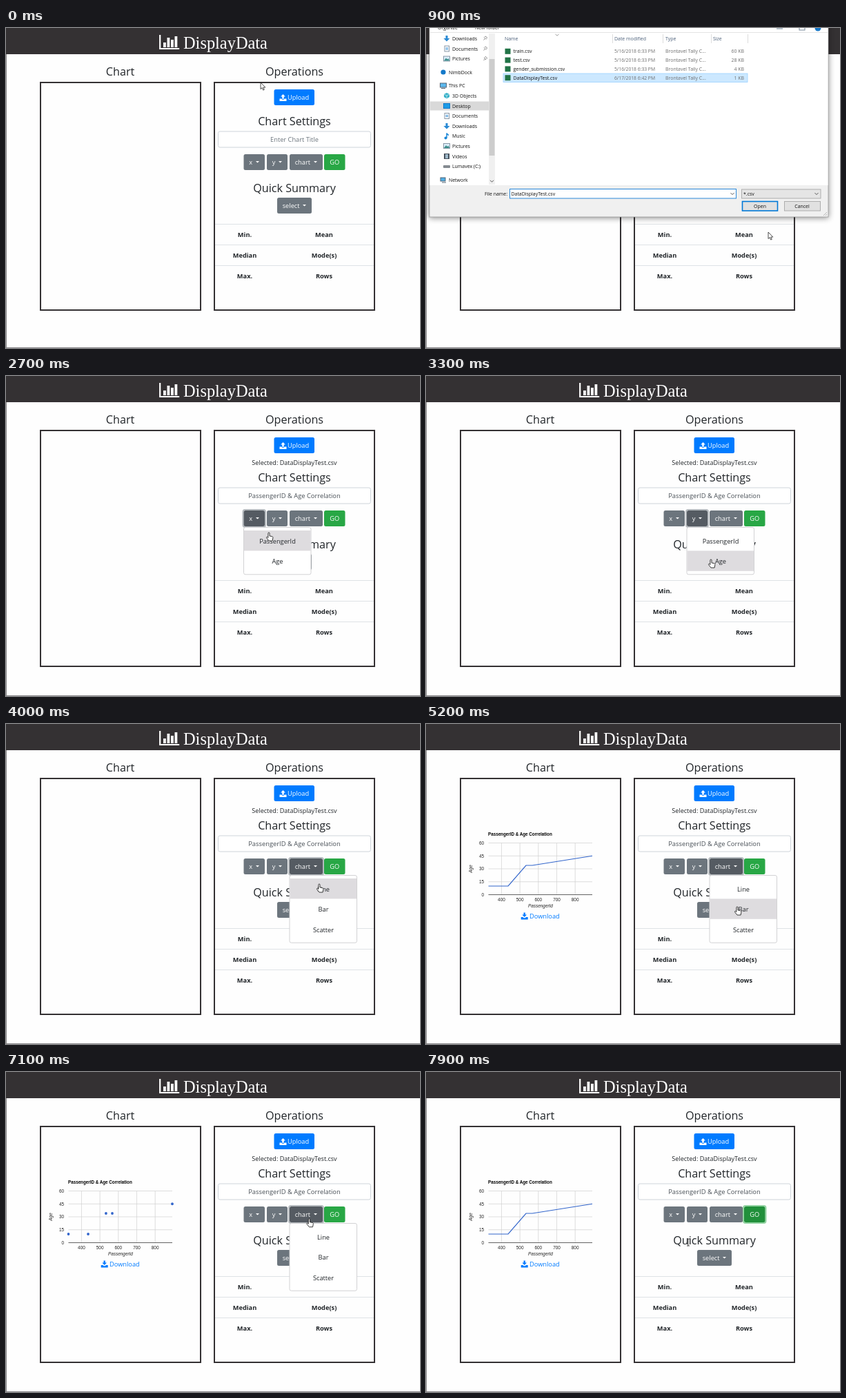
These frames come from a looping animation (600 by 464 pixels, 8 s). An HTML page:

```html
<!DOCTYPE html>
<html lang="en">
<head>
<meta charset="utf-8">
<title>Chart builder demo</title>
<style>
  html, body { margin: 0; width: 100%; height: 100%; overflow: hidden; background: #fefefe; }
  svg { display: block; width: 600px; height: 464px; }
  text { font: 9.25px "Open Sans", "Noto Sans", sans-serif; fill: #212529; white-space: pre; }
  .mid { text-anchor: middle; }
  .end { text-anchor: end; }
  .brand { font: 24.4px "Liberation Serif", serif; fill: #fff; }
  .head { font-size: 16.2px; }
  .white { fill: #fff; }
  .link { fill: #007bff; }
  .bold { font-weight: 700; }
  .hint { fill: #6c757d; }
  .typed { fill: #495057; font-size: 9.35px; }
  .win text { font-size: 6.95px; fill: #111; }
  .win .dim { fill: #6d6d6d; }
  .win .col { fill: #4c607a; }
  .win { filter: drop-shadow(0 1px 4px #0007); }
  .plot text { font: 6.4px "Liberation Sans", Arial, sans-serif; fill: #222; }
  .plot .title { font-weight: 700; font-size: 6.27px; fill: #000; }
  .plot .axis { font-style: italic; }
</style>
</head>
<body>
<svg id="stage" viewBox="0 0 600 464"></svg>
<script>
const LOOP = 8000, STEP = 100;
const TITLE = 'PassengerID & Age Correlation', FILE = 'DataDisplayTest.csv';
const DIALOG = [400, 1200], PICKED = 600, TYPING = [1500, 2100];

// time, x, y, pointer shape held until the next entry
const PATH = [
  [0, 369, 79, 'arrow'], [200, 408, 100, 'hand'], [400, 410, 101, 'arrow'],
  [600, 190, 72, 'arrow'], [700, 200, 76, 'arrow'], [900, 496, 296, 'arrow'],
  [1000, 486, 261, 'arrow'], [1200, 483, 256, 'arrow'], [1500, 440, 173, 'beam'],
  [2100, 440, 175, 'beam'], [2400, 360, 205, 'hand'], [2500, 360, 206, 'hand'],
  [2700, 381, 227, 'hand'], [2800, 381, 236, 'hand'], [3000, 392, 206, 'hand'],
  [3300, 413, 266, 'hand'], [3600, 433, 206, 'hand'], [3700, 434, 207, 'hand'],
  [4000, 454, 232, 'hand'], [4400, 476, 206, 'hand'], [4500, 476, 206, 'hand'],
  [4800, 435, 206, 'hand'], [5200, 451, 265, 'hand'], [5600, 476, 206, 'hand'],
  [6000, 435, 206, 'hand'], [6400, 446, 297, 'hand'], [6800, 476, 206, 'hand'],
  [7000, 435, 206, 'hand'], [7300, 452, 232, 'hand'], [7600, 476, 206, 'hand'],
  [7700, 474, 208, 'arrow'], [7900, 380, 247, 'beam']
];

// click time, button, time its menu closes
const CLICKS = [
  [2500, 'x', 2900], [3100, 'y', 3400], [3700, 'chart', 4100], [4500, 'GO'],
  [4800, 'chart', 5300], [5600, 'GO'], [6000, 'chart', 6500], [6800, 'GO'],
  [7000, 'chart', 7400], [7600, 'GO']
];
const FIELDS = ['PassengerId', 'Age'];
const MENUS = { x: FIELDS, y: FIELDS, chart: ['Line', 'Bar', 'Scatter'] };
const BUTTONS = { x: [344.5, 30.5], y: [378, 30], chart: [411, 48], GO: [461, 30.5] };
const DATA = [[329, 10], [436, 10], [533, 34], [567, 34], [893, 45]];

const stage = document.getElementById('stage');
const within = (t, [a, b]) => t >= a && t < b;
const esc = s => s.replace(/&/g, '&amp;');
const text = (x, y, s, cls = '', more = '') =>
  `<text x="${x}" y="${y}" class="${cls}" ${more}>${esc(String(s))}</text>`;
const rect = (x, y, w, h, fill, more = '') =>
  `<rect x="${x}" y="${y}" width="${w}" height="${h}" fill="${fill}" ${more}/>`;
const path = (d, fill, more = '') => `<path d="${d}" fill="${fill}" ${more}/>`;
const line = (d, color, width = 1) => path(d, 'none', `stroke="${color}" stroke-width="${width}"`);
const move = (x, y, s) => `<g transform="translate(${x} ${y})">${s}</g>`;
const chevron = (x, y, color = '#555') => line(`M${x - 2.5} ${y - 1.2}l2.5 2.5 2.5-2.5`, color);

const TRAY = 'M0 6h2.7l1.3 1.3h2L7.3 6H10v3.6H0z';
const upIcon = TRAY + 'M5-.5l3.3 3.4H6.2v3.4H3.8V2.9H1.7z';
const downIcon = TRAY + 'M3.8-.5h2.4v3h2.1L5 6 1.7 2.5h2.1z';

const POINTERS = {
  arrow: path('M0 0v9.6l2.2-2 1.5 3.5 1.6-.7-1.5-3.3h3z', '#fff', 'stroke="#222" stroke-width=".8"'),
  hand: path('M-1.1 1.2c0-1.7 2.1-1.7 2.1 0v3.7l3.7.8c1 .3 1.4.9 1.2 1.9l-.8 4.4H0l-3.4-4.3c-.6-1 .5-1.8 1.3-1.1l1 .9z',
    '#fff', 'stroke="#222" stroke-width=".9"'),
  beam: line('M-2-5h4M0-5v10M-2 5h4', '#333', .9)
};

function pointer(t) {
  let i = PATH.length - 1;
  while (PATH[i][0] > t) i--;
  const [t0, x0, y0, shape] = PATH[i];
  const [t1, x1, y1] = PATH[i + 1] || [LOOP, x0, y0];
  const u = (t - t0) / (t1 - t0), k = u * u * (3 - 2 * u);
  return { x: x0 + (x1 - x0) * k, y: y0 + (y1 - y0) * k, shape };
}

function button(label, x, y, w, active) {
  const go = label === 'GO';
  const fill = go ? (active ? '#21903b' : '#28a745') : (active ? '#555b62' : '#6c757d');
  const ring = active
    ? rect(x - 1, y - 1, w + 2, 25, 'none', `rx="3" stroke="${go ? '#93d3a2' : '#b5babe'}" stroke-width="2"`) : '';
  const body = ring + rect(x, y, w, 23, fill, 'rx="2.5"');
  return go ? body + text(x + w / 2, y + 15.3, label, 'mid white')
    : body + text(x + 7.7, y + 15.3, label, 'white') + path(`M${x + w - 13} ${y + 10}h5l-2.5 2.6z`, '#fff');
}

function header() {
  const bars = [[228, 7], [233.5, 14], [239, 11], [244.5, 16]];
  return rect(0, 0, 600, 38, '#343133') + line('M223.2 10v20h28', '#fff', 2.2) +
    bars.map(([x, h]) => rect(x, 28 - h, 3.8, h, '#fff')).join('') +
    text(257, 30, 'DisplayData', 'brand');
}

function menu(name, cur) {
  const x = BUTTONS[name][0], items = MENUS[name], pitch = 29.4;
  const over = cur.x > x && cur.x < x + 97 ? Math.floor((cur.y - 224) / pitch) : -1;
  return rect(x, 219.5, 97.5, items.length * pitch + 9.5, '#fff', 'rx="2.5" stroke="#d2d2d4"') +
    items.map((s, i) => (i === over ? rect(x + .5, 224 + i * pitch, 96.5, pitch, '#dedcdf') : '') +
      text(x + 49, 243 + i * pitch, s, 'mid')).join('');
}

function plot(kind) {
  const L = 90.5, R = 241, T = 172.5, B = 247.5, bar = kind === 'bar';
  const idX = v => L + (v - 329) * .2668, ageY = v => B - v * 1.25;
  const ageX = v => L + v * 2.508, idY = v => T + .5 + (900 - v) * .127;
  const ages = [0, 15, 30, 45, 60];
  const xs = bar ? ages.map(v => [v, ageX(v)]) : [4, 5, 6, 7, 8].map(n => [n * 100, idX(n * 100)]);
  const ys = bar ? [900, 775, 650, 525, 400].map(v => [v, idY(v)]) : ages.map(v => [v, ageY(v)]);
  let s = text(90, 162.3, TITLE, 'title');
  for (const [v, x] of xs) s += line(`M${x} ${T}V${B}`, '#d0d0d0', .7) + text(x, 256.6, v, 'mid');
  for (const [v, y] of ys) s += line(`M${L} ${y}H${R}`, '#d0d0d0', .7) + text(84, y + 2.3, v, 'end');
  s += line(bar ? `M${L} ${T}V${B}` : `M${L} ${B}H${R}`, '#444', .8);
  if (bar) s += DATA.map(([id, age]) => rect(L, idY(id) - 1.1, age * 2.508, 2.2, '#3366cc')).join('');
  else if (kind === 'line') s += line('M' + DATA.map(([id, age]) => `${idX(id)} ${ageY(age)}`).join('L'), '#3366cc', 1.2);
  else s += DATA.map(([id, age]) => `<circle cx="${idX(id)}" cy="${ageY(age)}" r="1.9" fill="#3366cc"/>`).join('');
  s += text(166, 266, 'PassengerId', 'axis mid') + text(0, 0, 'Age', 'axis mid', 'transform="translate(66.5 210) rotate(-90)"');
  return `<g class="plot">${s}</g>` + move(137.7, 274, path(downIcon, '#007bff')) + text(150, 282.3, 'Download', 'link');
}

function page(t, focus) {
  const uploaded = t >= DIALOG[1], drop = uploaded ? 12 : 0;
  const frame = x => rect(x, 79, 232, 330 + drop, 'none', 'stroke="#343133" stroke-width="2"');
  const typed = TITLE.slice(0, Math.max(0, Math.round((t - TYPING[0]) / (TYPING[1] - TYPING[0]) * TITLE.length)));
  let s = rect(0, 0, 600, 464, '#fefefe') + line('M.5 38V464M0 463.5H600', '#8a888b') + header() +
    text(165.5, 69.3, 'Chart', 'head mid') + text(418, 69.3, 'Operations', 'head mid') + frame(50) + frame(302) +
    rect(388.5, 89, 58.5, 23, '#007bff', 'rx="2.5"') + move(396.5, 96.5, path(upIcon, '#fff')) +
    text(408, 104.3, 'Upload', 'white');
  if (uploaded) s += text(418, 129.3, 'Selected: ' + FILE, 'mid', 'style="font-size:9.05px"');

  const editing = within(t, TYPING);
  let low = text(418, 141, 'Chart Settings', 'head mid') +
    rect(307.5, 150, 221, 23, '#fff', `rx="2.5" stroke="${editing ? '#80bdff' : '#ced4da'}"`) +
    (typed ? text(418, 165, typed, 'mid typed') : text(418, 165, 'Enter Chart Title', 'mid hint'));
  for (const [name, [x, w]] of Object.entries(BUTTONS)) low += button(name, x, 183, w, focus === name);
  low += text(418, 237.5, 'Quick Summary', 'head mid') + button('select', 393, 246, 50, false);
  [['Min.', 'Mean'], ['Median', 'Mode(s)'], ['Max.', 'Rows']].forEach(([a, b], i) => {
    const y = 284 + i * 30;
    low += line(`M303 ${y}.5H533`, '#dee2e6') + text(346, y + 18.7, a, 'mid bold') + text(461, y + 18.7, b, 'mid bold');
  });
  return s + move(0, drop, low);
}

function navIcon(kind, x, y) {
  const blue = '#2a8ad4';
  switch (kind) {
    case 'down': return path(`M${x - 1.5} ${y - 4}h3v4h3l-4.5 4.5-4.5-4.5h3z`, blue);
    case 'doc': return rect(x - 3, y - 4, 6.5, 8, '#fff', 'stroke="#8796a5"') + line(`M${x - 1.5} ${y - 1}h3.5m-3.5 2h3.5`, blue);
    case 'pic': return rect(x - 4.5, y - 3.5, 9, 7, '#dceefa', 'stroke="#8796a5"') + path(`M${x - 4} ${y + 3}l3-4 2 2 1.5-1.5 1.5 3.5z`, '#3b8e8b');
    case 'cloud': return `<circle cx="${x}" cy="${y}" r="3.6" fill="#1479c9"/>`;
    case 'pc': return rect(x - 4.5, y - 3.5, 9, 6, '#5bb8ee', 'stroke="#567"') + line(`M${x - 3} ${y + 4}h6`, '#567');
    case 'cube': return path(`M${x} ${y - 4}l4 2v4l-4 2.5-4-2.5v-4z`, '#38b1c8') + line(`M${x - 4} ${y - 2}l4 2 4-2m-4 2v4.5`, '#e2f6fa', .7);
    case 'desk': return rect(x - 4.5, y - 3.5, 9, 7, '#1c9be6', 'stroke="#1479c9"');
    case 'note': return line(`M${x} ${y + 3}v-7q1 2 3 3`, '#1b87d6', 1.5) + `<circle cx="${x - 1.5}" cy="${y + 3}" r="2" fill="#1b87d6"/>`;
    case 'film': return rect(x - 4, y - 4, 8, 8, '#47525e') + rect(x - 2, y - 3, 4, 6, '#9db8c9');
    case 'disk': return rect(x - 5, y - 1.5, 10, 4, '#858b91', 'rx="1"');
    default: return rect(x - 4, y - 3, 7, 5, '#4eaee5', 'stroke="#567"') + line(`M${x - 2} ${y + 4}h6`, '#567');
  }
}

function dialog(t) {
  const picked = t >= PICKED, grey = '#d5d5d5';
  let s = rect(5, -20, 578, 294, '#f0f0f0', 'stroke="#999" stroke-width=".8"') + rect(5.5, -20, 577, 248, '#fff') +
    text(17, 2, 'Organize') + text(71, 2, 'New folder') +
    rect(508, -3, 9, 5, '#b8c3cd') + rect(541, -3, 8, 6, '#fff', 'stroke="#789"') +
    '<circle cx="568" cy="0" r="4.5" fill="#1677c8"/>' + line('M5 6.5H582', '#e4e4e4') +
    rect(91, 8, 9, 219, '#f0f0f0') + rect(91.5, 45, 8, 140, '#cdcdcd') + chevron(95.5, 222) +
    rect(6, 106.5, 85, 13, '#d9d9d9');

  const nav = [
    ['down', 'Downloads', 15], ['doc', 'Documents', 30], ['pic', 'Pictures', 44.5],
    ['cloud', 'NimbDock', 64], ['pc', 'This PC', 83.5], ['cube', '3D Objects', 98],
    ['desk', 'Desktop', 113], ['doc', 'Documents', 127.5], ['down', 'Downloads', 142],
    ['note', 'Music', 156.5], ['pic', 'Pictures', 171], ['film', 'Videos', 186],
    ['disk', 'Lumavex (C:)', 200.5], ['net', 'Network', 220]
  ];
  nav.forEach(([kind, label, y], i) => {
    const root = ['cloud', 'pc', 'net'].includes(kind);
    s += navIcon(kind, root ? 25 : 30, y) + text(root ? 33 : 38, y + 2.6, label);
    if (i < 3) s += line(`M83.5 ${y + 2.5}l2-2m-1.5-2l3 3m-2-3.5l1.5-1 2 2-1 1.5`, '#777', .9);
  });

  s += chevron(190, 10, '#999') + [270, 343, 413, 466].map(x => line(`M${x}.5 9V22`, grey, .8)).join('') +
    [[114, 'Name'], [273, 'Date modified'], [347, 'Type'], [416, 'Size']].map(([x, c]) => text(x, 18.2, c, 'col')).join('');
  if (picked) s += rect(112, 66, 354, 12.5, '#cce8ff', 'stroke="#99d1ff" stroke-width=".8"');
  [['train.csv', '5/16/2018 6:33 PM', 60], ['test.csv', '5/16/2018 6:33 PM', 28],
   ['gender_submission.csv', '5/16/2018 6:33 PM', 4], [FILE, '6/17/2018 6:42 PM', 1]].forEach(([f, date, size], i) => {
    const y = 36.3 + i * 12.8;
    s += rect(114.5, y - 6.5, 8, 8, '#217346') + text(126.5, y, f) + text(273, y, date, 'dim', 'style="font-size:6.75px"') +
      text(347, y, 'Brontavel Tally C...', 'dim') + text(461, y, size + ' KB', 'end dim');
  });

  s += text(118, 242.6, 'File name:', 'end') + rect(121.5, 233.5, 328, 13.5, '#fff', 'stroke="#2b88d8"') +
    (picked ? text(123.5, 242.8, FILE) : '') + chevron(444, 240.3) +
    rect(457.5, 234, 114.5, 13, '#e5e5e5', 'stroke="#adadad"') + text(460, 242.8, '*.csv') + chevron(566, 240.3) +
    rect(458.5, 251.5, 51, 13.5, '#e1e1e1', 'stroke="#0078d7" stroke-width="1.6"') + text(484, 260.8, 'Open', 'mid') +
    rect(519.5, 251.5, 52, 13.5, '#e1e1e1', 'stroke="#adadad"') + text(545, 260.8, 'Cancel', 'mid') +
    line('M576 272l5-5m-2 5l2-2', '#aaa', .8);
  return `<g class="win">${s}</g>`;
}

function draw(t) {
  const cur = pointer(t), past = CLICKS.filter(c => c[0] <= t);
  const [, focus, closes] = past[past.length - 1] || [];
  const runs = past.filter(c => c[1] === 'GO').length;
  let s = page(t, focus);
  if (runs) s += plot(['line', 'bar', 'scatter', 'line'][runs - 1]);
  if (closes > t) s += menu(focus, cur);
  if (within(t, DIALOG)) s += dialog(t);
  stage.innerHTML = s + move(cur.x, cur.y, POINTERS[cur.shape]);
}

const start = performance.now();
let shown = -1;
function tick() {
  const t = Math.floor((performance.now() - start) % LOOP / STEP) * STEP;
  if (t !== shown) draw(shown = t);
  requestAnimationFrame(tick);
}
tick();
</script>
</body>
</html>
```
